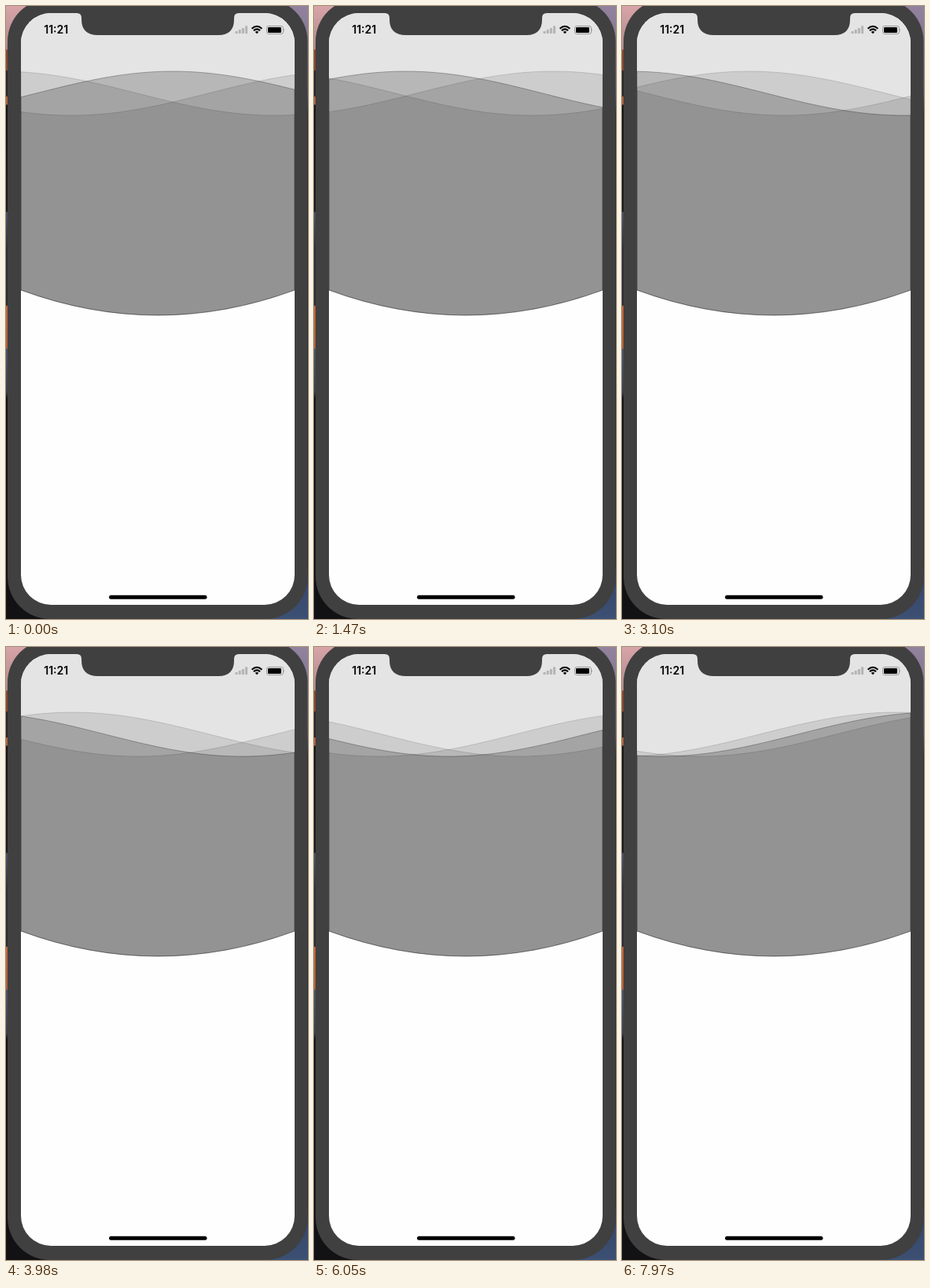
An HTML page that plays this animation: 384x779 px, repeating every 8000 ms.

```html
<!DOCTYPE html>
<html lang="en">
<head>
<meta charset="utf-8">
<title>Waves</title>
<style>
  html, body { margin: 0; width: 100%; height: 100%; overflow: hidden; background: #404040; }
  svg { display: block; width: 384px; height: 779px; }
  text { font: 600 14px Inter, "Liberation Sans", sans-serif; }
</style>
</head>
<body>
<svg viewBox="0 0 384 779">
  <defs>
    <linearGradient id="left" x2="0" y2="1">
      <stop offset="0" stop-color="#d8a4a8"/>
      <stop offset=".07" stop-color="#b08a8c"/>
      <stop offset=".072" stop-color="#8a4a2c"/>
      <stop offset=".105" stop-color="#8a4a2c"/>
      <stop offset=".106" stop-color="#26262c"/>
      <stop offset=".147" stop-color="#26262c"/>
      <stop offset=".148" stop-color="#b0643c"/>
      <stop offset=".16" stop-color="#b0643c"/>
      <stop offset=".162" stop-color="#151517"/>
      <stop offset=".335" stop-color="#1a1a1e"/>
      <stop offset=".337" stop-color="#4a5266"/>
      <stop offset=".4" stop-color="#2c2f3a"/>
      <stop offset=".488" stop-color="#2a2c34"/>
      <stop offset=".49" stop-color="#c0683a"/>
      <stop offset=".558" stop-color="#b0603a"/>
      <stop offset=".56" stop-color="#4a566a"/>
      <stop offset=".63" stop-color="#38404e"/>
      <stop offset=".64" stop-color="#121214"/>
      <stop offset="1" stop-color="#121214"/>
    </linearGradient>
    <linearGradient id="right" x2="0" y2="1">
      <stop offset="0" stop-color="#92829e"/>
      <stop offset=".14" stop-color="#70687e"/>
      <stop offset=".18" stop-color="#1c1c1e"/>
      <stop offset=".9" stop-color="#1c1c20"/>
      <stop offset=".95" stop-color="#38486a"/>
      <stop offset="1" stop-color="#3c5074"/>
    </linearGradient>
    <clipPath id="screen"><rect x="19" y="9" width="348" height="752" rx="38"/></clipPath>
  </defs>

  <rect width="192" height="779" fill="url(#left)"/>
  <rect x="192" width="192" height="779" fill="url(#right)"/>
  <rect x="2" y="-9" width="381.5" height="788" rx="54" fill="#404040"/>

  <g clip-path="url(#screen)">
    <rect x="19" y="9" width="348" height="752" fill="#fefefe"/>
    <path d="M19 9H367V361Q193 425 19 361Z" fill="#e4e4e4"/>
    <g id="waves" stroke="#000" stroke-width=".9"></g>
  </g>
  <path d="M90 8V9Q96 9 96 15V17Q96 37 117 37H270Q290 37 290 17V15Q290 9 296 9V8Z" fill="#404040"/>

  <text x="63.7" y="35" text-anchor="middle">11:21</text>
  <g fill="#b4b4b4">
    <rect x="291.5" y="32" width="3" height="3" rx=".6"/>
    <rect x="295.7" y="30" width="3" height="5" rx=".6"/>
    <rect x="299.9" y="28" width="3" height="7" rx=".6"/>
    <rect x="304.1" y="25.3" width="3" height="9.7" rx=".6"/>
  </g>
  <g fill="none" stroke="#000" stroke-width="2">
    <path d="M312.6 28.8Q319 22.8 325.4 28.8"/>
    <path d="M314.9 31.3Q319 27.4 323.1 31.3"/>
    <path d="M316.8 32.9Q319 31 321.2 32.9L319 35.2Z" fill="#000" stroke="none"/>
  </g>
  <rect x="331.5" y="25.5" width="21" height="10" rx="2.6" fill="none" stroke="#999"/>
  <rect x="333" y="27" width="17" height="7" rx="1.3"/>
  <path d="M353.4 28.8Q355 30.5 353.4 32.2Z" fill="#999"/>
  <rect x="131" y="748.8" width="124.5" height="5" rx="2.5"/>
</svg>

<script>
  const LOOP = 8000, STEP = 147.5;
  const LEFT = 19, RIGHT = 367, MIDDLE = 111, HEIGHT = 28;
  const K = Math.PI / (RIGHT - LEFT);

  // Crest position at time zero, drift relative to the shared travel, opacity.
  const waves = [
    { crest: -7, drift: 2, fill: .1, line: .16 },
    { crest: 431, drift: 4, fill: .1, line: .16 },
    { crest: 212, drift: 3, fill: .2, line: .32 },
  ];
  // [time in ms, shared travel in px]
  const travelKeys = [[0, 0], [1470, 31.6], [2210, 48.1], [3980, 86.5],
                      [5160, 110.6], [6930, 148.5], [8000, 171]];

  const group = document.getElementById('waves');
  for (const wave of waves) {
    wave.path = document.createElementNS(group.namespaceURI, 'path');
    wave.path.setAttribute('fill-opacity', wave.fill);
    wave.path.setAttribute('stroke-opacity', wave.line);
    group.append(wave.path);
  }

  function travelAt(time) {
    const i = travelKeys.findIndex(([end]) => end > time);
    const [t0, a] = travelKeys[i - 1], [t1, b] = travelKeys[i];
    return a + (b - a) * (time - t0) / (t1 - t0);
  }

  function outline(crest) {
    let d = '';
    for (let x = LEFT; x <= RIGHT; x += 4) {
      const y = MIDDLE - HEIGHT * Math.cos(K * (x - crest));
      d += (d ? 'L' : 'M') + x + ' ' + y.toFixed(2);
    }
    return d + `V361Q193 425 ${LEFT} 361Z`;
  }

  const start = performance.now();
  function draw(now) {
    const time = Math.max(0, now - start) % LOOP;
    const step = Math.min(54, Math.floor((time + 8) / STEP));
    const travel = travelAt(step * STEP);
    for (const { path, crest, drift } of waves) {
      path.setAttribute('d', outline(crest - drift * travel));
    }
    requestAnimationFrame(draw);
  }
  draw(start);
</script>
</body>
</html>
```
